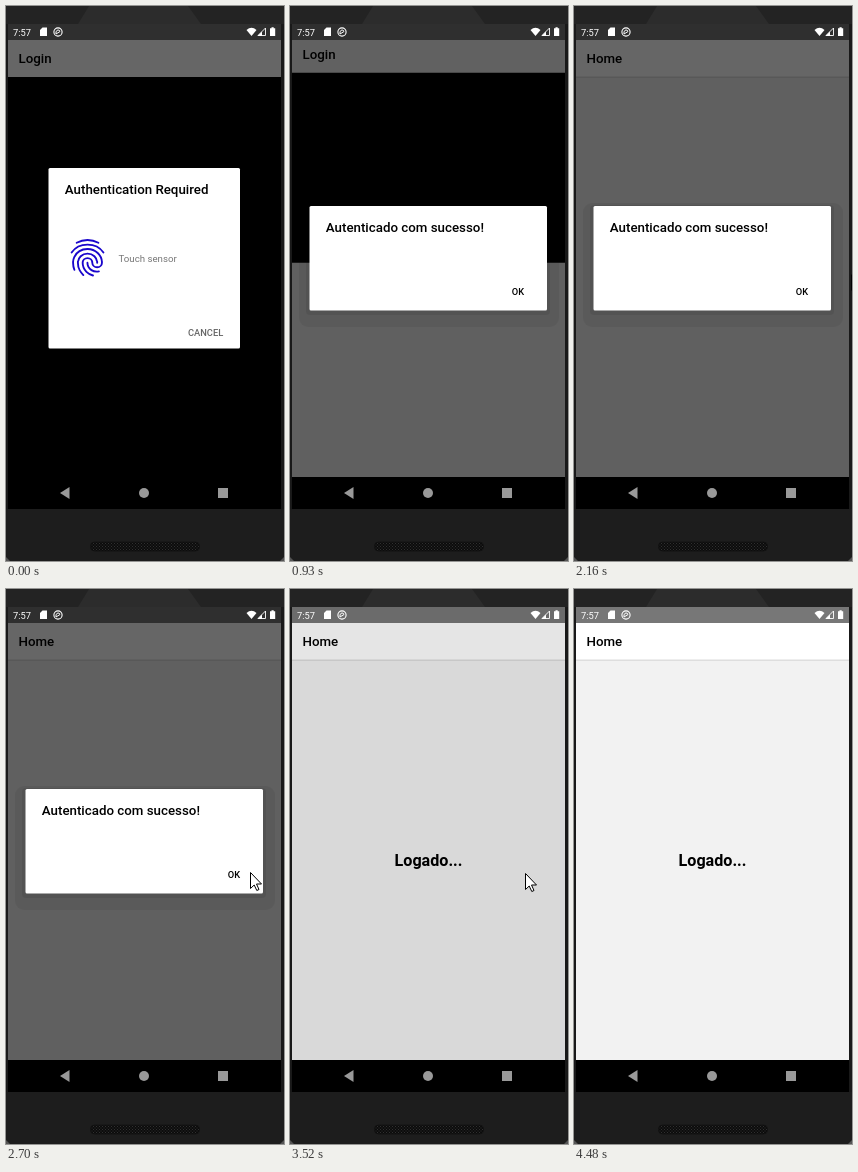
Write an HTML page that moves like this. It is 278x555 px and loops after 5.94 s.

```html
<!DOCTYPE html>
<html lang="pt">
<head>
<meta charset="utf-8">
<title>Login</title>
<style>
  html, body { margin: 0; width: 100%; height: 100%; overflow: hidden; background: #1d1d1d; }
  svg { display: block; width: 100%; height: 100%; }
  text { font-family: Roboto, sans-serif; font-size: 9.3px; }
  .title { font-size: 13.3px; font-weight: 500; }
  .action { font-weight: 500; }
</style>
</head>
<body>
<svg viewBox="0 0 278 555">
  <defs>
    <clipPath id="screen"><rect x="2" y="34" width="273" height="437"/></clipPath>
    <clipPath id="reveal"><rect id="revealBox" x="2" y="34" width="273" height="437"/></clipPath>
    <pattern id="mesh" width="3" height="3" patternUnits="userSpaceOnUse">
      <rect width="3" height="3" fill="#0c0c0c"/>
      <path d="M0 0h1v1H0zM1.5 1.5h1v1h-1z" fill="#303030"/>
    </pattern>
  </defs>

  <!-- phone body -->
  <rect width="278" height="555" fill="#1d1d1d"/>
  <rect width="278" height="18" fill="#232323"/>
  <path d="M83 0H182L195 18H72Z" fill="#2c2c2c"/>
  <path d="M0 18H2V503H0ZM275 18H278V503H275Z" fill="#191919"/>
  <rect x="84.5" y="536" width="109" height="9" rx="4" fill="url(#mesh)" stroke="#111" stroke-width=".8"/>
  <path d="M0 551L4 555H0ZM278 551L274 555H278Z" fill="#555"/>
  <rect x="2" y="471" width="273" height="32" fill="#000"/>
  <g fill="#999">
    <path d="M54 487L63.5 481V493Z"/>
    <circle cx="138" cy="487" r="5"/>
    <rect x="212" y="482" width="10" height="10"/>
  </g>

  <rect x="2" y="18" width="273" height="16" fill="#777"/>
  <g clip-path="url(#screen)">
    <rect id="loginBody" x="2" y="34" width="273" height="437"/>
    <g id="login">
      <rect x="2" y="20" width="273" height="51" fill="#fff"/>
      <text class="title" x="12.5" y="57">Login</text>
      <rect id="shade" x="2" y="20" width="273" height="51"/>
    </g>
    <g id="form">
      <g fill="none" stroke="#8c7fc4" stroke-width="1.3">
        <rect x="72.5" y="216.5" width="132" height="30" rx="3"/>
        <rect x="72.5" y="253" width="132" height="30" rx="3"/>
      </g>
      <rect x="72" y="289" width="133" height="30" rx="3" fill="#6650b8"/>
      <g fill="#fff">
        <text x="79" y="235">nome de usuário</text>
        <text x="79" y="271">senha</text>
      </g>
      <text x="138.5" y="308" text-anchor="middle">Entrar</text>
    </g>
    <g id="home" clip-path="url(#reveal)">
      <rect x="2" y="34" width="273" height="437" fill="#f2f2f2"/>
      <rect x="2" y="70" width="273" height="2" fill="#dedede"/>
      <rect x="2" y="34" width="273" height="36.5" fill="#fff"/>
      <text class="title" x="12.5" y="57">Home</text>
      <text id="logged" x="138.5" y="277" text-anchor="middle" style="font-size:16.1px;font-weight:700">Logado...</text>
    </g>
  </g>
  <rect id="dim" x="2" y="18" width="273" height="453"/>

  <!-- status bar -->
  <g fill="#fff">
    <text x="7" y="29.5">7:57</text>
    <path d="M36.5 21.5H41V30H34V24Z"/>
    <circle cx="52" cy="26" r="4.1" fill="none" stroke="#fff" stroke-width="1.1"/>
    <path d="M50 28V25.5L52 23.8L54.2 25.2M50 28L54 25.5" fill="none" stroke="#fff"/>
    <path d="M240.5 24Q245.5 19.5 250.5 24L245.5 30Z"/>
    <path d="M259.5 22V29.5H252Z" fill="none" stroke="#fff" stroke-width=".9"/>
    <path d="M256 25.5V30H251.5Z"/>
    <path d="M264 22.3H265.5V21.3H267.7V22.3H269.2V30H264Z"/>
  </g>

  <g id="auth">
    <rect x="42.5" y="162" width="191.5" height="180.5" rx="1.5" fill="#fff"/>
    <text class="title" x="58.8" y="188">Authentication Required</text>
    <g transform="translate(59.1 229.3) scale(1.87)" fill="none" stroke="#1a06cc" stroke-linecap="round">
      <path d="M6.2 3.97C8 3 10 2.5 12 2.5S15.8 2.9 17.8 3.97"/>
      <path d="M3.5 9.22C5.3 6.6 8.3 5 12 5S18.7 6.6 20.5 9.2"/>
      <path d="M9.75 21.29C8.9 20.4 8.5 19.9 7.83 18.75S6.84 16.2 6.84 14.66c0-2.7 2.3-4.89 5.16-4.89s5.16 2.19 5.16 4.89"/>
      <path d="M11.94 14.66c0 1.57.8 3.06 2.16 3.97.78.53 1.7.8 2.82.8.3 0 .75-.03 1.15-.1"/>
      <path d="M14.91 21.5c-1.5-.42-2.45-.95-3.5-1.98-1.3-1.3-2.02-3.02-2.02-4.86 0-1.35 1.16-2.44 2.58-2.44s2.58 1.09 2.58 2.44 1.16 2.44 2.58 2.44 2.58-1.09 2.58-2.44c0-4.05-3.48-7.33-7.75-7.33-3.03 0-5.8 1.7-7.06 4.31-.43.88-.64 1.9-.64 3.02 0 .84.08 2.16.7 3.78"/>
    </g>
    <text x="112.5" y="256" fill="#777" style="font-size:9.7px">Touch sensor</text>
    <text class="action" x="182" y="330" fill="#666">CANCEL</text>
  </g>

  <g id="success">
    <g id="shadow">
      <rect x="9" y="197" width="260" height="124" rx="9" fill-opacity=".06"/>
      <rect x="16" y="199" width="244" height="110" rx="4" fill-opacity=".08"/>
    </g>
    <rect x="19.5" y="200" width="237.5" height="104.5" rx="1.5" fill="#fff" id="panel"/>
    <text class="title" x="35.8" y="226">Autenticado com sucesso!</text>
    <text class="action" x="221.8" y="289">OK</text>
  </g>

  <path id="cursor" d="M.5 .5V16.5L4.2 13L6.8 18.5L9 17.5L6.5 12H11.5Z" fill="#fff" stroke="#000"/>
</svg>
<script>
const LOOP = 5940;
const el = id => document.getElementById(id);
const show = (id, on) => el(id).setAttribute('display', on ? 'inline' : 'none');
const set = (id, name, value) => el(id).setAttribute(name, value);

// [start, value] lists; each value holds until the next start
const DIM = [[0, .6], [810, .27], [930, .6], [3520, .1], [3640, 0]];
const REVEAL = [[0, 0], [930, .49], [1080, .95], [1200, 1]];
const CURSOR = [
  [0, null], [2160, [277, 268]], [2280, [232, 260]], [2400, [198, 275]], [2550, [240, 280]],
  [2700, [244, 283]], [2820, [238, 284]], [3130, [235, 284]], [4480, null]
];
const at = (steps, t) => steps.filter(s => s[0] <= t).pop()[1];

function draw(t) {
  const fading = t >= 810 && t < 930;
  const p = at(REVEAL, t);
  const top = 34 + 437 * (1 - p);

  show('form', t < 930);
  set('loginBody', 'fill', fading ? '#1e1e1e' : '#000');
  set('login', 'transform', `translate(0 ${-8.7 * p})`);
  set('shade', 'fill-opacity', .1 * p);

  show('home', p > 0);
  set('revealBox', 'y', top);
  set('revealBox', 'height', 471 - top);
  show('logged', t >= 3520);
  set('dim', 'fill-opacity', at(DIM, t));

  show('auth', t < 810);
  show('success', t >= 810 && t < 3520);
  show('shadow', !fading);
  set('panel', 'fill-opacity', fading ? .85 : 1);

  const tip = at(CURSOR, t);
  show('cursor', tip);
  if (tip) set('cursor', 'transform', `translate(${tip})`);
}

const start = performance.now();
function tick() {
  draw((performance.now() - start) % LOOP);
  requestAnimationFrame(tick);
}
tick();
</script>
</body>
</html>
```
